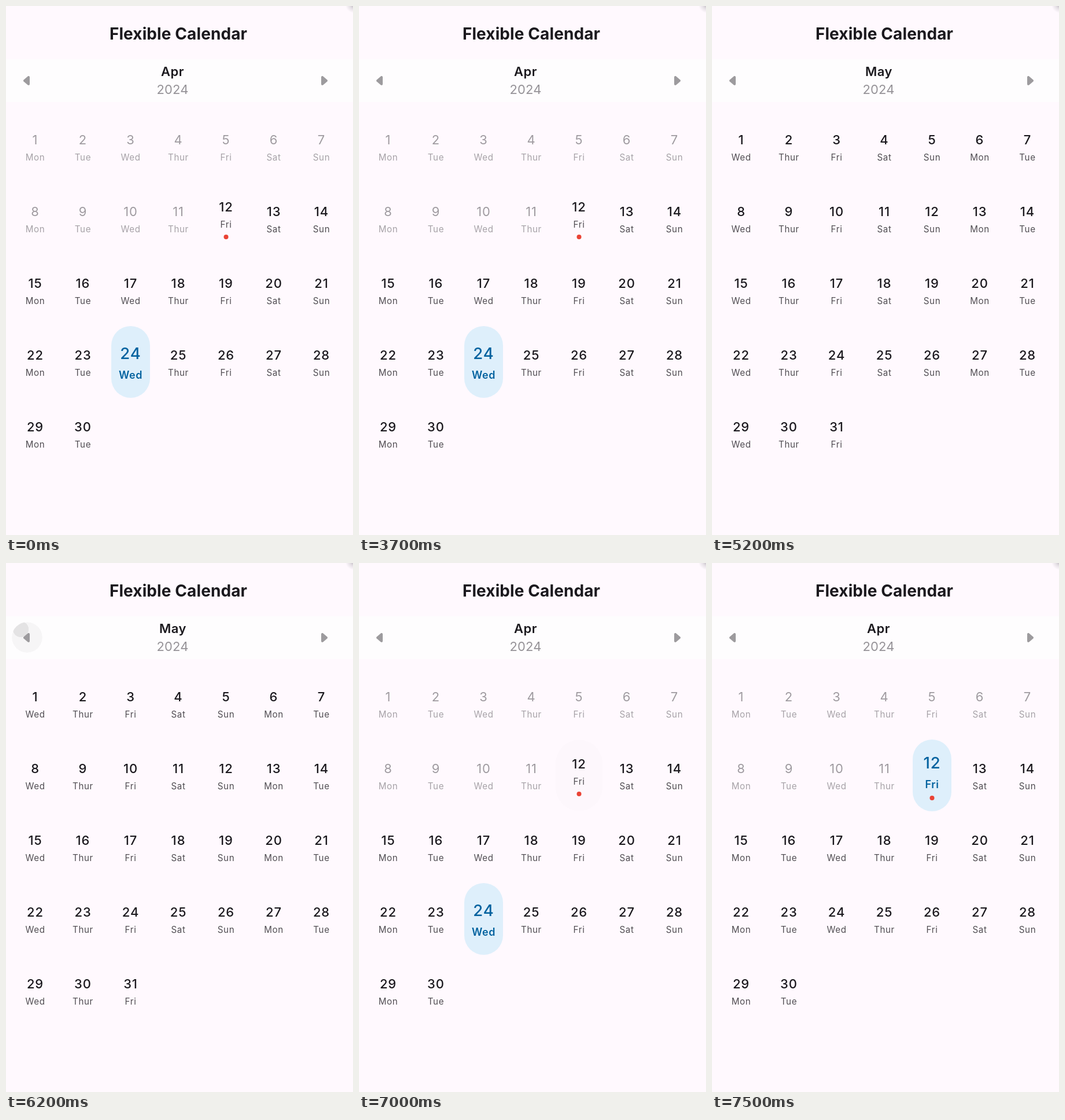
An HTML page for the animation above (8 s loop, 600x914 px).

```html
<!DOCTYPE html>
<html lang="en">
<head>
<meta charset="utf-8">
<title>Flexible Calendar</title>
<style>
html, body { margin: 0; width: 100%; height: 100%; overflow: hidden; background: #fff9fe; }
svg { display: block; width: 600px; height: 914px; }
text { font-family: Inter, Roboto, sans-serif; text-anchor: middle; fill: #1b191e; }
.title { font-size: 28px; font-weight: 700; letter-spacing: .1px; }
.month { font-size: 22px; font-weight: 600; letter-spacing: .5px; }
.year { font-size: 22px; letter-spacing: .1px; fill: #969398; }
.num { font-size: 22px; font-weight: 500; letter-spacing: .9px; }
.day { font-size: 15.2px; letter-spacing: .6px; fill: #504d52; }
.past .num { font-weight: 400; fill: #9f9ba0; }
.past .day { fill: #a6a2a7; }
.on .num { font-size: 27.5px; letter-spacing: .9px; fill: #02629f; }
.on .day { font-size: 18px; font-weight: 600; letter-spacing: .6px; fill: #02629f; }
.pill { fill: #deeffb; }
.dot { fill: #ea4335; }
.arrow { fill: #9d9b9e; stroke: #9d9b9e; stroke-width: 4; stroke-linejoin: round; }

.apr { animation: apr 8s step-end infinite; }
.may { opacity: 0; animation: may 8s step-end infinite; }
.before { animation: before 8s step-end infinite; }
.after { opacity: 0; animation: after 8s step-end infinite; }
@keyframes apr { 0%, 78.75% { opacity: 1 } 65% { opacity: 0 } 100% { opacity: 1 } }
@keyframes may { 0%, 78.75% { opacity: 0 } 65% { opacity: 1 } 100% { opacity: 0 } }
@keyframes before { 0% { opacity: 1 } 88.75%, 100% { opacity: 0 } }
@keyframes after { 0% { opacity: 0 } 88.75%, 100% { opacity: 1 } }

.ripple { opacity: 0; animation: 8s linear infinite; }
.splash { transform-box: fill-box; transform-origin: center; animation: 8s linear infinite; }
.hold { animation-name: hold; }
.hold .splash { animation-name: spread; }
.tap { animation-name: tap; }
.tap .splash { animation-name: burst; }
.late, .late .splash { animation-delay: .8s; }
@keyframes hold { 0%, 75.6% { opacity: 0 } 77.5%, 78.75% { opacity: 1 } 83.75%, 100% { opacity: 0 } }
@keyframes spread { 0%, 75.6% { transform: scale(.1) } 77.5% { transform: scale(1) } 78.75% { transform: scale(1.6) } 83.75%, 100% { transform: scale(4.5) } }
@keyframes tap { 0%, 65% { opacity: 0 } 66.25% { opacity: 1 } 71.25%, 100% { opacity: 0 } }
@keyframes burst { 0%, 65% { transform: scale(.1) } 66.25% { transform: scale(1) } 71.25%, 100% { transform: scale(4.5) } }
</style>
</head>
<body>
<svg id="stage" viewBox="0 0 600 914"></svg>
<script>
const WEEK = ['Mon', 'Tue', 'Wed', 'Thur', 'Fri', 'Sat', 'Sun'];
const colX = d => 50.5 + (d - 1) % 7 * 82.5;
const rowY = d => 239 + Math.floor((d - 1) / 7) * 124;

const text = (cls, x, y, s) => `<text class="${cls}" x="${x}" y="${y}">${s}</text>`;
const group = (cls, body) => `<g class="${cls}">${body}</g>`;
const dot = (x, y) => `<circle class="dot" cx="${x}" cy="${y}" r="4"/>`;

function cell(d, first, lift = 0) {
  const x = colX(d), y = rowY(d) - lift;
  return text('num', x, y, d) + text('day', x, y + 28, WEEK[(d - 1 + first) % 7]);
}

function picked(d, first, lift = 0) {
  const x = colX(d), y = rowY(d);
  return `<rect class="pill" x="${x - 33.5}" y="${y - 58}" width="67" height="124" rx="33.5"/>` +
    text('num', x, y - 1 - lift, d) +
    text('day', x, y + 33 - lift, WEEK[(d - 1 + first) % 7]);
}

function april() {
  let out = text('month', 288, 121, 'Apr');
  for (let d = 1; d <= 30; d++) {
    if (d < 12) out += group('past', cell(d, 0));
    else if (d !== 12 && d !== 24) out += cell(d, 0);
  }
  const x = colX(12), y = rowY(12);
  return out +
    group('before', cell(12, 0, 8) + dot(x, y + 36) + group('on', picked(24, 0))) +
    group('after', cell(24, 0) + group('on', picked(12, 0, 7) + dot(x, y + 43)));
}

function may() {
  let out = text('month', 288.5, 121, 'May');
  for (let d = 1; d <= 31; d++) out += cell(d, 2);
  return out;
}

// A tinted area with a splash growing inside it
function ripple(cls, id, box, [x, y, r], tint, ink) {
  const [bx, by, w, h] = box;
  const area = `<rect x="${bx}" y="${by}" width="${w}" height="${h}" rx="${w / 2}"`;
  return `<clipPath id="${id}">${area}/></clipPath>` +
    `<g class="ripple ${cls}" clip-path="url(#${id})">${area} fill-opacity="${tint}"/>` +
    `<circle class="splash" cx="${x}" cy="${y}" r="${r}" fill-opacity="${ink}"/></g>`;
}

document.getElementById('stage').innerHTML =
  `<defs><radialGradient id="corner">
    <stop offset="0" stop-color="#77737b" stop-opacity=".5"/>
    <stop offset=".5" stop-color="#77737b" stop-opacity=".18"/>
    <stop offset="1" stop-color="#77737b" stop-opacity="0"/>
  </radialGradient></defs>
  <rect width="600" height="914" fill="#fff9fe"/>
  <circle cx="601" cy="-2" r="14" fill="url(#corner)"/>
  <rect y="92" width="600" height="74" fill="#fefdfe"/>` +
  text('title', 298, 58, 'Flexible Calendar') +
  text('year', 288, 152, 2024) +
  ripple('hold', 'prev', [10, 102, 53, 53], [25.5, 114.5, 13.5], .03, .075) +
  ripple('tap', 'next', [523.5, 102, 53, 53], [550, 128.5, 13.5], .03, .075) +
  ripple('hold late', 'pick', [339.5, 305, 82, 124], [380.5, 376, 21], .007, .005) +
  '<path class="arrow" d="M32 129L39 123V135Z"/><path class="arrow" d="M554 129L547 123V135Z"/>' +
  group('apr', april()) + group('may', may());
</script>
</body>
</html>
```
